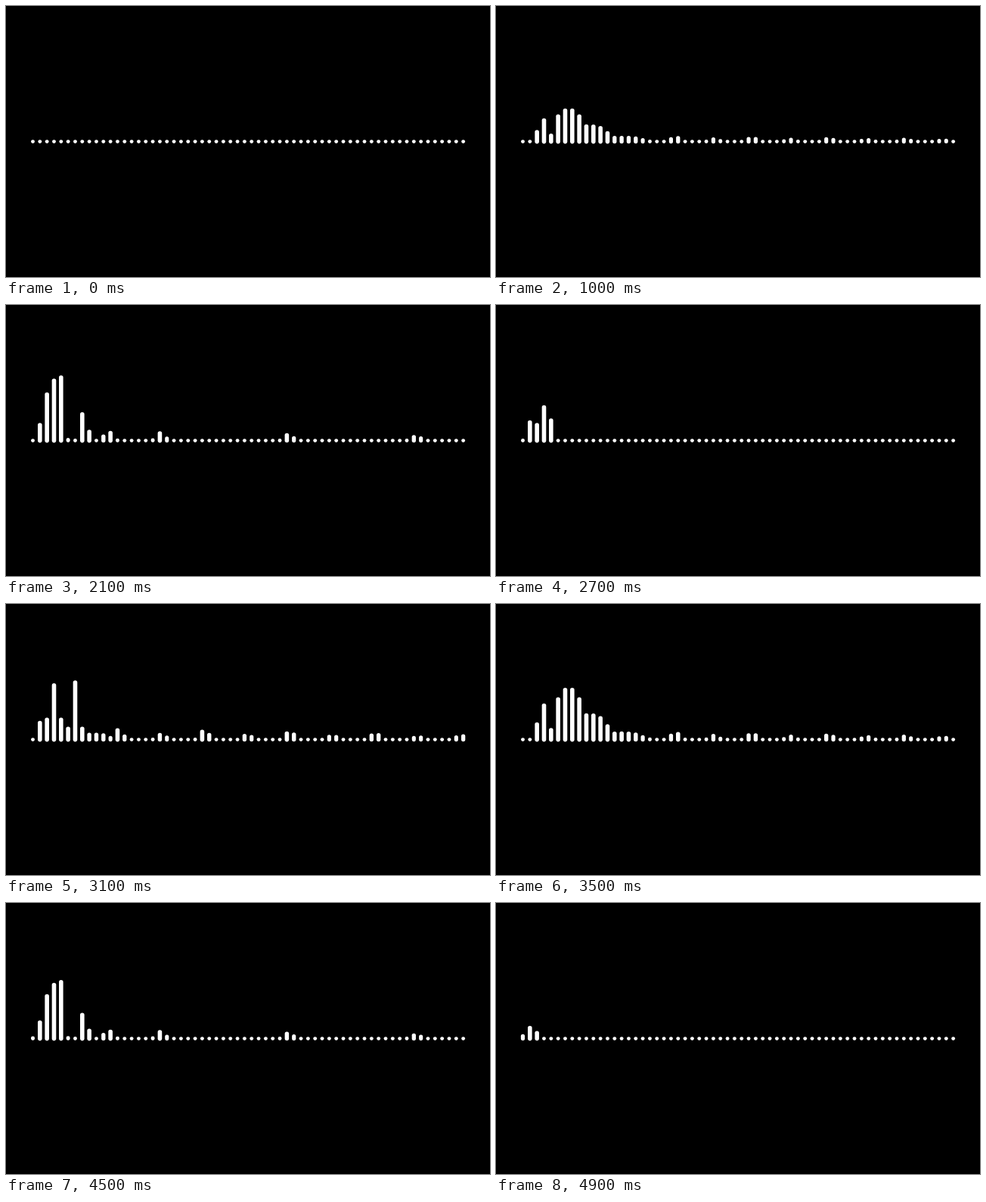
Recreate the animation shown at these times as an HTML page with a canvas. Size 640 by 359 pixels, loop 5 s.

```html
<!DOCTYPE html>
<html lang="en">
<head>
<meta charset="utf-8">
<title>Audio spectrum</title>
<style>
  html, body { margin: 0; height: 100%; overflow: hidden; background: #000; }
  canvas { display: block; width: 100vw; height: 100vh; }
</style>
</head>
<body>
<canvas id="stage" width="640" height="359"></canvas>
<script>
const ctx = document.getElementById('stage').getContext('2d');
const COUNT = 62, LEFT = 35.5, GAP = 9.33, BASE = 179.6;
const LOOP = 5000, STEP = 100;

const bump = (i, centre, height, spread) =>
  height * Math.exp(-(((i - centre) / spread) ** 4));

// A voice is a few strong peaks [centre, height, spread] over a row of
// overtones at multiples of its pitch, alternating in strength.
function voice(peaks, pitch = COUNT, odd = 0, even = odd) {
  return Array.from({ length: COUNT }, (_, i) => {
    const n = Math.round(i / pitch);
    const strength = n === 0 ? 0 : n % 2 ? odd : even;
    const overtone = bump(i, n * pitch, strength * (1 - i / 90), 0.85);
    return Math.max(overtone, ...peaks.map(peak => bump(i, ...peak)));
  });
}

const open = voice([[2.8, 57, 1.8], [6.8, 62, 0.85], [9, 9, 2]], 5.42, 4, 14);
const deep = voice([[2, 61, 0.98], [3.55, 87, 1], [7.2, 35, 0.78], [10.8, 10, 0.9]], 18.1, 12);
const hum = voice([[1.4, 25, 0.9], [3.2, 44, 0.95]]);
const broad = voice([[2.9, 45, 0.95], [6.5, 66, 2.2], [9, 32, 3.4], [14, 8, 3]], 5.42, 7, 10);
const thin = voice([[1.5, 19, 0.9], [3, 56, 1], [6, 59, 0.88], [8.5, 5, 2.5]], 6.07, 6, 11);
const fade = voice([[1.1, 14, 1]]);

// time, voice, gain
const score = [
  [0, fade, 0], [800, fade, 0], [1200, broad, 1.25], [1500, open, 1],
  [1800, open, 1.58], [2100, deep, 1], [2700, hum, 1], [3100, thin, 1.28],
  [3500, broad, 1], [3700, broad, 1.15], [4100, thin, 1], [4400, deep, 1.12],
  [4900, fade, 1], [LOOP, fade, 0]
];

function heights(t) {
  const next = score.findIndex(([time]) => time > t);
  const [t0, a, gainA] = score[next - 1], [t1, b, gainB] = score[next];
  const k = (t - t0) / (t1 - t0);
  return a.map((h, i) => h * gainA * (1 - k) + b[i] * gainB * k);
}

function draw(t) {
  ctx.fillStyle = '#000';
  ctx.fillRect(0, 0, 640, 359);
  ctx.strokeStyle = '#fff';
  ctx.lineCap = 'round';
  heights(t).forEach((h, i) => {
    const x = LEFT + i * GAP;
    ctx.lineWidth = 4.9 + Math.min(h, 8) * 0.09;
    ctx.beginPath();
    ctx.moveTo(x, BASE);
    ctx.lineTo(x, BASE - h - 0.01);
    ctx.stroke();
  });
}

const start = performance.now();
function tick() {
  const t = (performance.now() - start) % LOOP;
  draw(Math.floor(t / STEP) * STEP);
  requestAnimationFrame(tick);
}
tick();
</script>
</body>
</html>
```
